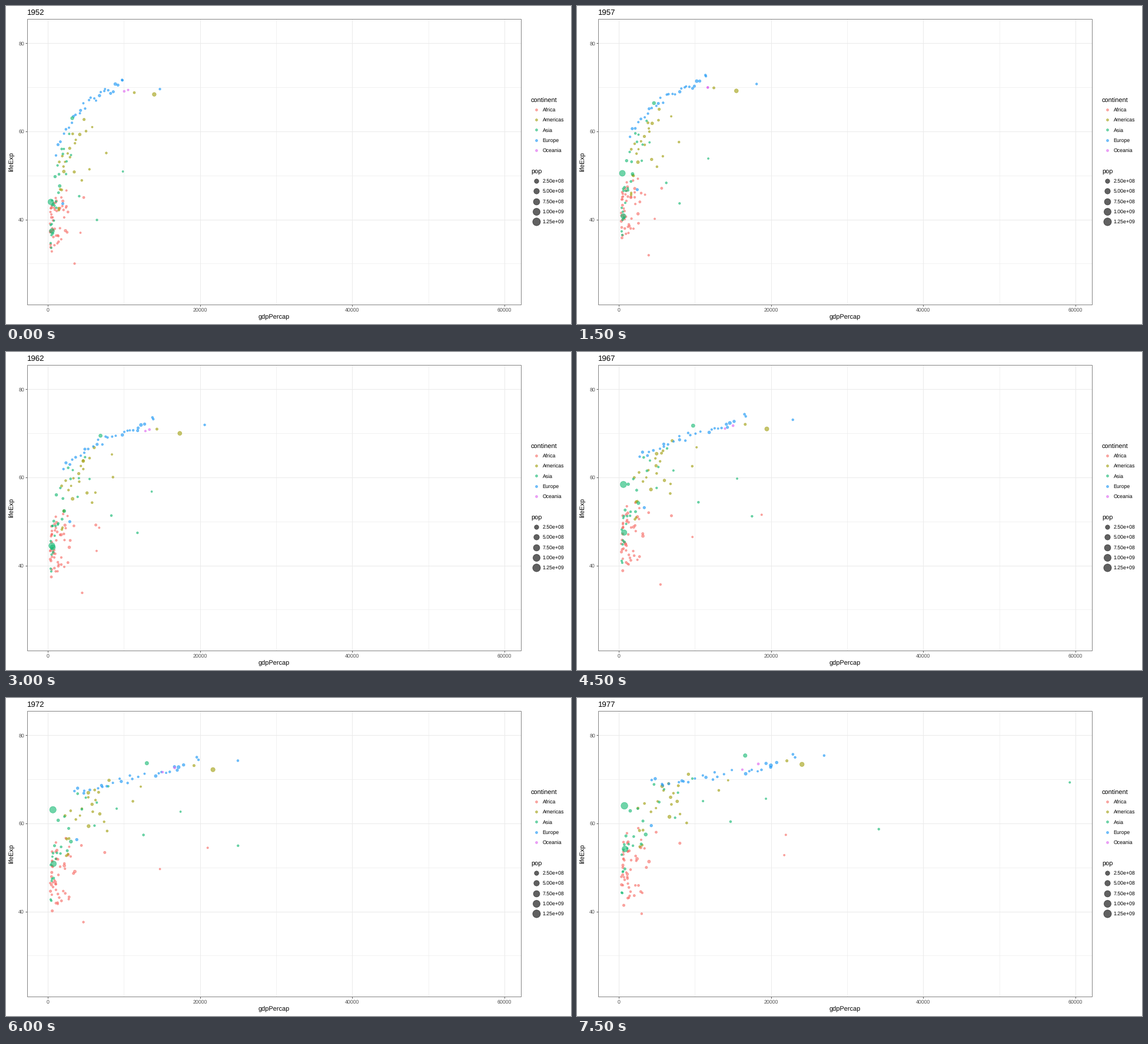
These frames come from a looping animation (960x540 px, 8 s). A matplotlib script:

```python
import numpy as np
import matplotlib.pyplot as plt
from matplotlib.animation import FuncAnimation
from matplotlib.patches import Rectangle

W, H, DPI = 960, 540, 72
LEFT, RIGHT, TOP, BOTTOM = 36, 875, 22, 507
STEPS, HOLD, TICK = 6, 3, 500      # six years, three 500 ms ticks each
EDGE = 0.7
COLORS = {"Africa": "#F8706A", "Americas": "#A2A012", "Asia": "#18BA75",
          "Europe": "#1C98F6", "Oceania": "#DF68F0"}

plt.rcParams.update({"font.family": "Liberation Sans", "text.hinting": "none"})
rng = np.random.default_rng(12)
T = np.linspace(0, 1, STEPS)


def px(gdp):
    return 71 + np.asarray(gdp) * 258.6 / 20000


def py(life):
    return 362.6 - (np.asarray(life) - 40) * 7.4825


def marker(diameter):
    return (diameter - EDGE) ** 2


def pop_marker(pop):
    """Marker area for a population in millions."""
    return marker(3.55 + 10.65 * np.sqrt(np.asarray(pop) / 1319))


tracks = []


def lead(continent, gdp, life, pop, power=1.0):
    """One notable country, eased through evenly spaced key points."""
    def along(keys, t):
        return np.interp(t, np.linspace(0, 1, len(keys)), keys)
    tracks.append((continent, along(gdp, T ** power), along(life, T), pop * 1.1 ** (5 * T)))


def cloud(continent, n, start, end, spread):
    """n countries; start(u) and end(u, gdp, life) give (gdp, life) at either end."""
    u = (np.arange(n) + rng.random(n)) / n
    g0, l0 = start(u)
    l0 = l0 + rng.uniform(-spread, spread, n)
    g1, l1 = end(u, g0, l0)
    pops = np.minimum(rng.lognormal(1.5, 1.1, n), 60)
    for a, b, c, d, pop in zip(g0, l0, g1, l1, pops):
        tracks.append((continent, a + (c - a) * T ** 1.3, b + (d - b) * T ** 0.8,
                       pop * 1.1 ** (5 * T)))


def vary(u, low, high):
    return rng.uniform(low, high, len(u))


cloud("Africa", 47,
      lambda u: (300 * 9 ** u, 36.5 + 5 * u),
      lambda u, g, l: (g * vary(u, 1, 1.9), l + vary(u, 7, 14)), 6)
cloud("Americas", 20,
      lambda u: (1400 + 4500 * u ** 1.6, 45 + 13 * u),
      lambda u, g, l: (g * vary(u, 1.3, 2.5), 53 + (l - 40) * 0.8), 7)
cloud("Asia", 25,
      lambda u: (350 * 9 ** u, 35 + 22 * u),
      lambda u, g, l: (g * (1 + 2.7 * u ** 2), l + vary(u, 9, 15)), 5)
cloud("Europe", 28,
      lambda u: (1000 + 9100 * u, 54 + 7.4 * np.log(1 + 9.1 * u)),
      lambda u, g, l: (1800 + 2.1 * g + vary(u, -900, 900),
                       69.3 + 6 * u ** 2 + vary(u, -0.7, 0.9)), 1)

lead("Asia", [400, 741], [44, 50.5, 44.5, 58.4, 63.1, 64], 556)
lead("Asia", [547, 813], [37.4, 54.2], 372)
lead("Asia", [3217, 16610], [63, 68.7, 72.5, 75.4], 86, 1.4)
lead("Asia", [6460, 34168], [39.9, 58.7], 4, 1.8)
lead("Asia", [4130, 14688], [45.3, 60.4], 6)
lead("Asia", [9867, 19340], [50.9, 65.6], 0.2)
lead("Asia", [108000, 59265], [55.6, 69.3], 1, 8)
lead("Africa", [2388, 3448, 6757, 18773, 21011, 21951], [42.7, 57.4], 1)
lead("Africa", [4293, 21746], [37, 52.8], 0.5, 2.3)
lead("Africa", [3521, 4200, 5800, 3009], [30, 39.5], 4)
lead("Africa", [4725, 8028], [45, 55.5], 15, 0.8)
lead("Africa", [2449, 4910], [43, 58], 9)
lead("Americas", [13990, 24073], [68.4, 70.4, 73.4], 158, 1.2)
lead("Americas", [11367, 22091], [68.8, 74.2], 15, 1.4)
lead("Americas", [7690, 13144], [55.1, 67.5], 6, 2)
lead("Americas", [2109, 6660], [50.9, 61.5], 57, 1.5)
lead("Americas", [3478, 7675], [50.8, 65], 30)
lead("Europe", [14734, 26982], [69.6, 75.4], 5, 0.8)
lead("Europe", [1969, 4269], [43.6, 59.5], 22)
lead("Oceania", [10040, 18334], [69.1, 73.5], 9)
lead("Oceania", [10557, 16234], [69.4, 72.2], 2)

names, gdps, lives, pops = zip(*tracks)
X, Y, S = px(gdps), py(lives), pop_marker(pops)

fig = plt.figure(figsize=(W / DPI, H / DPI), dpi=DPI, facecolor="white")
ax = fig.add_axes([0, 0, 1, 1])
ax.set(xlim=(0, W), ylim=(H, 0))
ax.axis("off")


def label(x, y, text, size=8.8, color="black", **kw):
    return ax.text(x, y, text, fontsize=size, color=color, **kw)


def line(xs, ys, color="#EBEBEB", width=1.0):
    ax.plot(xs, ys, color=color, lw=width, zorder=1, solid_capstyle="butt")


def dots(x, y, size, color):
    return ax.scatter(x, y, s=size, c=color, edgecolors=color, linewidths=EDGE,
                      alpha=0.62, zorder=3)


# panel: grid, ticks and border
for g in range(0, 60001, 10000):
    x, major = float(px(g)), g % 20000 == 0
    line([x, x], [TOP, BOTTOM], width=1.07 if major else 0.6)
    if major:
        line([x, x], [BOTTOM, BOTTOM + 3], "#555555")
        label(x, 519, g, color="#4D4D4D", ha="center")
for v in range(30, 81, 10):
    y, major = float(py(v)), v % 20 == 0
    line([LEFT, RIGHT], [y, y], width=1.07 if major else 0.6)
    if major:
        line([LEFT - 3, LEFT], [y, y], "#555555")
        label(31, y + 3.2, v, color="#4D4D4D", ha="right")
panel = Rectangle((LEFT, TOP), RIGHT - LEFT, BOTTOM - TOP, fill=False,
                  ec="#858585", lw=1, zorder=4)
ax.add_patch(panel)

label(455.5, 531.7, "gdpPercap", 11, ha="center")
label(13.2, 264.5, "lifeExp", 11, rotation=90, rotation_mode="anchor", ha="center")
title = label(36, 15, "1952", 13.2)

# legends
label(892, 163.4, "continent", 11)
for i, (name, color) in enumerate(COLORS.items()):
    y = 175.7 + 17.28 * i
    dots([901], [y], [marker(4.6)], color)
    label(911.7, y + 3.2, name)
label(892, 284.3, "pop", 11)
for i in range(5):
    y, pop = 297 + 17.28 * i, 250 * (i + 1)
    dots([901], [y], [pop_marker(pop)], "black")
    label(911.7, y + 3.1, f"{pop * 1e6:.2e}")

points = dots(X[:, 0], Y[:, 0], S[:, 0], [COLORS[n] for n in names])
points.set_clip_path(panel)


def draw(i):
    k = i // HOLD
    points.set_offsets(np.column_stack([X[:, k], Y[:, k]]))
    points.set_sizes(S[:, k])
    title.set_text(str(1952 + 5 * k))
    return points, title


anim = FuncAnimation(fig, draw, frames=STEPS * HOLD - 2, interval=TICK,
                     init_func=lambda: draw(0), repeat=True, repeat_delay=0, blit=False)
plt.show()
```
